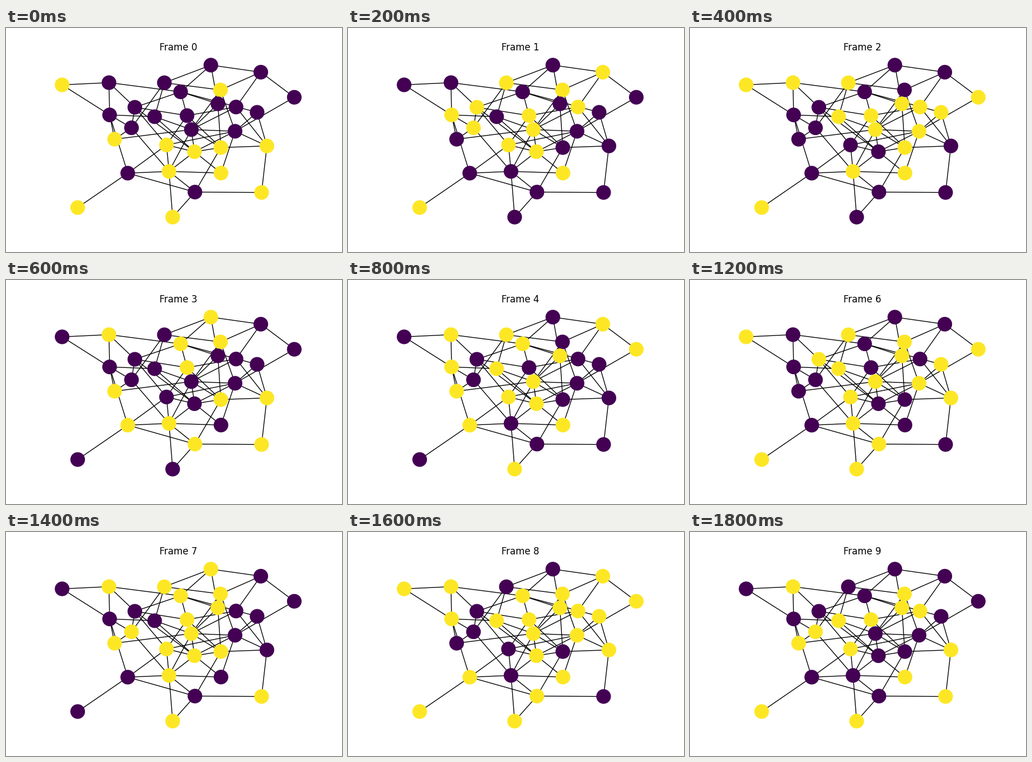
Write a matplotlib script that moves like this. It is 600 by 400 pixels and loops after 2000 ms.

```python
import matplotlib.pyplot as plt
from matplotlib.animation import FuncAnimation
from matplotlib.collections import LineCollection

PURPLE, YELLOW = "#440154", "#fde725"

# Node positions in stage pixels
NODES = {
    "A": (100.2, 101.5), "B": (183.9, 97.6), "C": (282.8, 97.8),
    "D": (365.8, 66.3), "E": (455, 78.9), "F": (514.8, 123.7),
    "G": (383, 110.6), "H": (311.8, 114), "I": (230.1, 141.6),
    "J": (185, 155.2), "K": (265.4, 158.4), "L": (323.3, 156.4),
    "M": (378.4, 135.4), "N": (410.8, 141.1), "O": (448.4, 150.6),
    "P": (224.1, 178.2), "Q": (194, 198.6), "R": (331, 181.4),
    "S": (409, 184.4), "T": (286.6, 208.9), "U": (336.5, 220.9),
    "V": (383.6, 213.5), "W": (465.9, 210.6), "X": (217.4, 259.2),
    "Y": (291.1, 256.1), "Z": (383.9, 259), "a": (337.4, 293),
    "b": (456.4, 293.7), "c": (297.6, 337.7), "d": (128, 320.6),
}

EDGES = (
    "AB AJ BJ BI BH CD CG CK CP DE DH DM EG EF EN FS GR GS HI HL HM HO "
    "IL IP IT IU JK JP JQ JX KR KU LN LT LV MR MV NR NW OS OW PQ PY QR "
    "RS RU RV RY ST SU SW SZ TU TX TY UV UY UZ VW Va Wb XY Xa Xd YZ Ya "
    "Yc ab ac"
).split()

# Nodes lit in yellow at each step
LIT = [
    "AGQTUVWYZbcd",
    "CEGIJLNPRTUZd",
    "ABCFKLMNORSVYZd",
    "BDGHLQVWXYab",
    "BCEFHJKMQRTUXZc",
    "AGKNPQRTVWbc",
    "ACFGIKMORSTWYacd",
    "BCDGHLMPQRTUVYbc",
    "ABEFGHJKLMNORSUWXZacd",
    "BGKLMNPQTWZbcd",
]

fig, ax = plt.subplots(figsize=(6, 4), dpi=100)
fig.subplots_adjust(left=0.125, right=0.9, bottom=0.11, top=0.88)
ax.set_xlim(75, 540)
ax.set_ylim(356, 48)
ax.axis("off")

lines = [(NODES[p], NODES[q]) for p, q in EDGES]
ax.add_collection(LineCollection(lines, colors="black", linewidths=1, zorder=1),
                  autolim=False)
xs, ys = zip(*NODES.values())
dots = ax.scatter(xs, ys, s=300, c=PURPLE, linewidths=1.5, zorder=2)
title = ax.set_title("Frame 0", fontsize=12, fontname="DejaVu Sans")


def update(step):
    colors = [YELLOW if name in LIT[step] else PURPLE for name in NODES]
    dots.set_facecolor(colors)
    dots.set_edgecolor(colors)
    title.set_text(f"Frame {step}")
    return dots, title


anim = FuncAnimation(fig, update, frames=len(LIT), interval=200,
                     repeat=True, repeat_delay=0)
plt.show()
```
